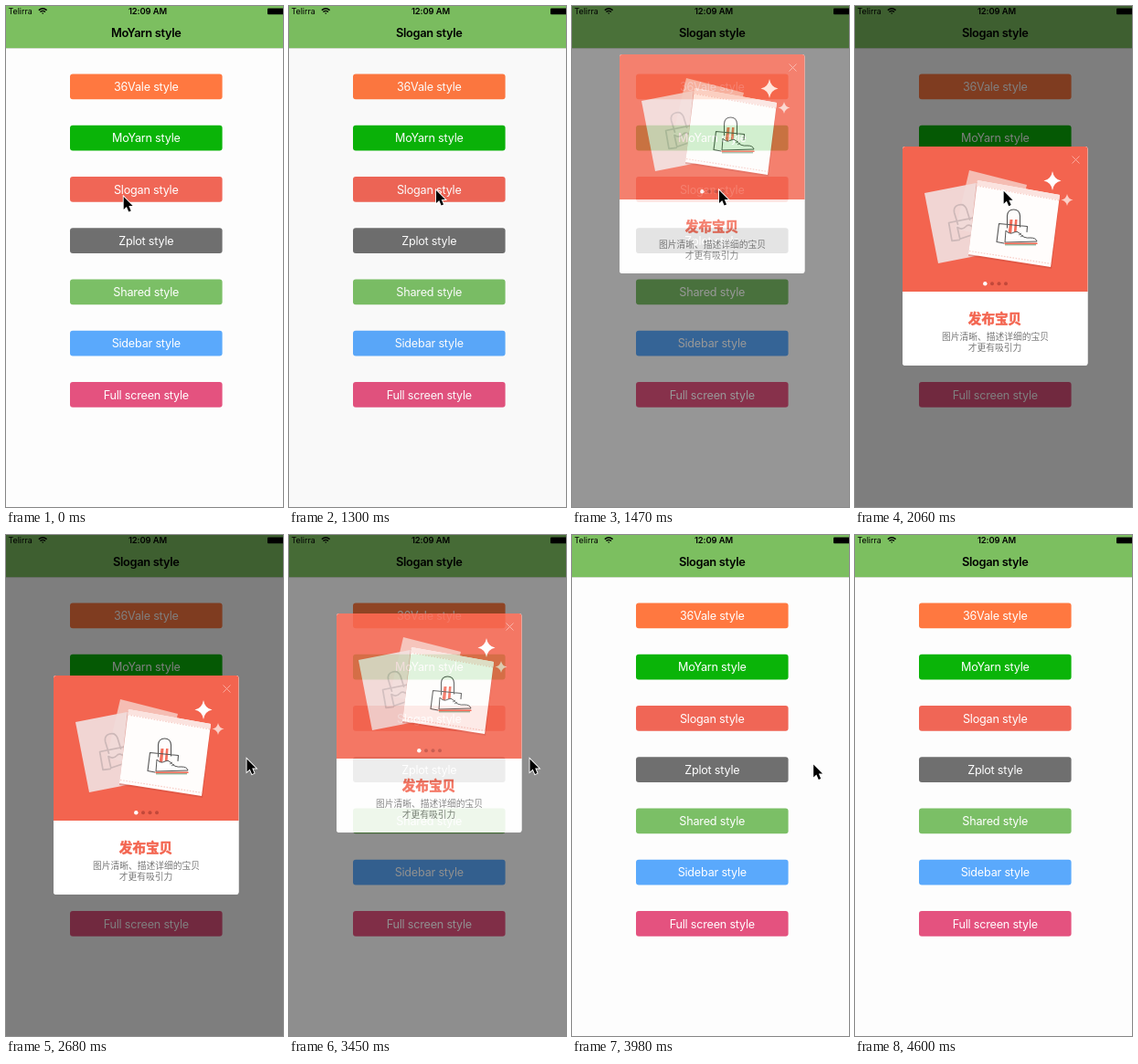
Write an HTML page that moves like this. It is 303 px wide and 549 px high and loops after 5.36 s.

```html
<!DOCTYPE html>
<html lang="en">
<head>
<meta charset="utf-8">
<title>Popup styles</title>
<style>
  html, body { margin: 0; width: 100%; height: 100%; overflow: hidden; background: #fdfdfd; }
  svg { display: block; width: 303px; height: 549px; }
  text { font-family: Inter, Roboto, "Liberation Sans", sans-serif; }
  .mid { text-anchor: middle; }
  #title { font-size: 12.8px; font-weight: 600; letter-spacing: -.3px; }
  .status { font-size: 8.9px; }
  .clock { font-size: 9.4px; font-weight: 600; letter-spacing: -.1px; }
  .button text { font-size: 12.6px; letter-spacing: -.2px; fill: #fff; }
  .zh { font-family: "Noto Sans CJK SC", "Noto Sans CJK", sans-serif; font-size: 9.75px; fill: #777; }
  .zh.head { font-size: 14.6px; font-weight: 900; fill: #f3644f; stroke: #f3644f; stroke-width: .5; }
</style>
</head>
<body>
<svg viewBox="0 0 303 549">
  <defs>
    <path id="bag" fill="none" stroke-linejoin="round" stroke-linecap="round"
          d="M163 106l-8-1.500 2.500-20 31 3-.5 6M166.500 89v-13q.5-7 7-7 6.500 0 7 7v12"/>
    <path id="shoe" stroke-linejoin="round"
          d="M164 105l1-13q4 5 9 2 3-2 6 1 4 6 12 5 6 0 7 4z"/>
  </defs>

  <rect width="303" height="549" fill="#fdfdfd"/>
  <rect width="303" height="46" fill="#7cbf60"/>
  <rect y="46" width="303" height=".6" fill="#b9c9b1"/>
  <text class="status" x="2.5" y="9">Telirra</text>
  <g fill="none" stroke="#000" stroke-width="1.4">
    <path d="M35.8 4.6q4.4-3.6 8.8 0M37.4 6.5q2.8-2.2 5.6 0"/>
    <path d="M39 7.6h2.4l-1.2 1.3z" fill="#000" stroke="none"/>
  </g>
  <text class="clock mid" x="155" y="9.2">12:09 AM</text>
  <rect x="286" y="2.600" width="20" height="6.600" rx="1"/>
  <text id="title" class="mid" x="153.2" y="34.3"></text>
  <g id="list"></g>

  <path id="mask" fill-rule="evenodd" opacity="0"/>

  <g id="popup" opacity="0">
    <rect x="52" width="202.5" height="240" rx="3" fill="#fff"/>
    <path d="M52 159V3q0-3 3-3h196.500q3 0 3 3v156z" fill="#f3644f"/>
    <path d="M237.500 10.500l8 8m0-8l-8 8" stroke="#fab3a7" stroke-width=".9"/>

    <path d="M125 26l63 16-16 63-62-15z" fill="#f5bdb3"/>
    <path d="M76 51l59-11.500 15 77-59 11.500z" fill="#f2dcdb" opacity=".95"/>
    <g transform="rotate(-17 172 90) translate(-50 -21)" fill="none" stroke="#cdb8b8" stroke-width="1.700">
      <use href="#bag"/>
      <use href="#shoe"/>
    </g>
    <path d="M133 39l91 16-9 79-91-14z" fill="#c94b3a" opacity=".45"/>
    <path d="M134 37l90 16-10 79-90-14z" fill="#fffdfc"/>
    <path d="M134 37l90 16-.7 5.500-90-16z" fill="#fbe3df"/>
    <path d="M133.200 43l90 16M125 114.500l89.300 14" stroke="#f8cfc8" stroke-width="1.2" stroke-dasharray="1.6 1.6"/>

    <path d="M169.500 80h3l-2 24h-4zM175 80h2.500l-1 15-3 2z" fill="#f3705e"/>
    <use href="#bag" stroke="#555" stroke-width="1.1"/>
    <use href="#shoe" fill="#fff" stroke="#555"/>
    <path d="M179 97l3-2m-1 4l3-2" stroke="#555" stroke-width=".8"/>
    <path d="M163.500 106.200h36" stroke="#f3644f" stroke-width="1.6"/>
    <path d="M164 107.800h34" stroke="#6d9b78" stroke-width="1"/>

    <path d="M216 27q1.500 9 9.500 10.500-8 1.500-9.500 10.500-1.500-9-9.500-10.500 8-1.500 9.500-10.500z" fill="#fff"/>
    <path d="M232 52q1 5.500 6.500 6.500-5.500 1-6.500 6.500-1-5.500-6.500-6.500 5.500-1 6.500-6.500z" fill="#fbd0c8"/>
    <g fill="#c2483a">
      <circle cx="142.300" cy="150.300" r="2.200" fill="#fff"/>
      <circle cx="150" cy="150.300" r="2"/>
      <circle cx="157.500" cy="150.300" r="2"/>
      <circle cx="165" cy="150.300" r="2"/>
    </g>
    <g lang="zh-CN">
      <text class="zh head mid" x="153" y="193.500">发布宝贝</text>
      <text class="zh mid" x="153.500" y="211.800">图片清晰、描述详细的宝贝</text>
      <text class="zh mid" x="153" y="224.200">才更有吸引力</text>
    </g>
  </g>

  <path id="cursor" d="M0 0v14l3.200-3 2.400 5.500 2.400-1.100-2.300-5.300h4.200z"
        stroke="#fff" stroke-width="1.800" paint-order="stroke"/>
</svg>

<script>
  const LOOP = 5360;
  const $ = id => document.getElementById(id);

  const buttons = [
    ['36Vale', '#ff7840'], ['MoYarn', '#0ab408'], ['Slogan', '#f06656'], ['Zplot', '#6f6f6f'],
    ['Shared', '#7bbf66'], ['Sidebar', '#5aa9fc'], ['Full screen', '#e4527f']
  ];
  $('list').innerHTML = buttons.map(([name, color], i) => {
    const y = 74.5 + i * 56.25;
    return `<g class="button"><rect x="70" y="${y}" width="166.600" height="27.700" rx="3" fill="${color}"/>
      <text class="mid" x="153.300" y="${y + 18.6}">${name} style</text></g>`;
  }).join('');

  const ease = u => {
    u = Math.min(1, Math.max(0, u));
    return u * u * (3 - 2 * u);
  };

  // Index of the current step out of n spread over [from, to]; -1 before the first.
  const step = (t, from, to, n) =>
    t < from ? -1 : Math.min(n - 1, Math.floor((t + 4 - from) / (to - from) * (n - 1)));

  // Cursor legs: first step, last step, step count, destination.
  const legs = [
    [50, 340, 6, 161, 202],
    [2060, 2560, 10, 259.5, 240],
    [2620, 2680, 2, 263.5, 245.5],
    [3980, 4490, 9, 296, 534],
    [4550, 4600, 2, 306, 560]
  ];

  function cursorAt(t) {
    let x = 128.7, y = 209;
    for (const [from, to, n, tx, ty] of legs) {
      const p = ease((step(t, from, to, n) + 0.75) / (n - 0.25));
      x += (tx - x) * p;
      y += (ty - y) * p;
    }
    return [x, y];
  }

  function shownAt(t) {
    const enter = step(t, 1300, 1590, 6);
    const leave = step(t, 3450, 3620, 4);
    if (enter < 0) return 0;
    if (leave < 0) return ease(0.11 + 0.2055 * enter);
    return 1 - ease(0.22 + 0.26 * leave);
  }

  function draw(t) {
    const p = shownAt(t);
    const y = Math.round(-394 + 548 * p);
    $('title').textContent = buttons[t < 1300 ? 1 : 2][0] + ' style';
    // The dimming leaves out the area behind the popup.
    $('mask').setAttribute('d', `M0-400h303v949H0z M55 ${y}h196.500q3 0 3 3v234q0 3-3 3H55q-3 0-3-3v-234q0-3 3-3z`);
    $('mask').setAttribute('opacity', p * 0.5);
    $('popup').setAttribute('opacity', p);
    $('popup').setAttribute('transform', `translate(0 ${y})`);
    $('cursor').setAttribute('transform', `translate(${cursorAt(t).join(' ')})`);
  }

  const start = performance.now();
  function tick() {
    draw((performance.now() - start) % LOOP);
    requestAnimationFrame(tick);
  }
  tick();
</script>
</body>
</html>
```
